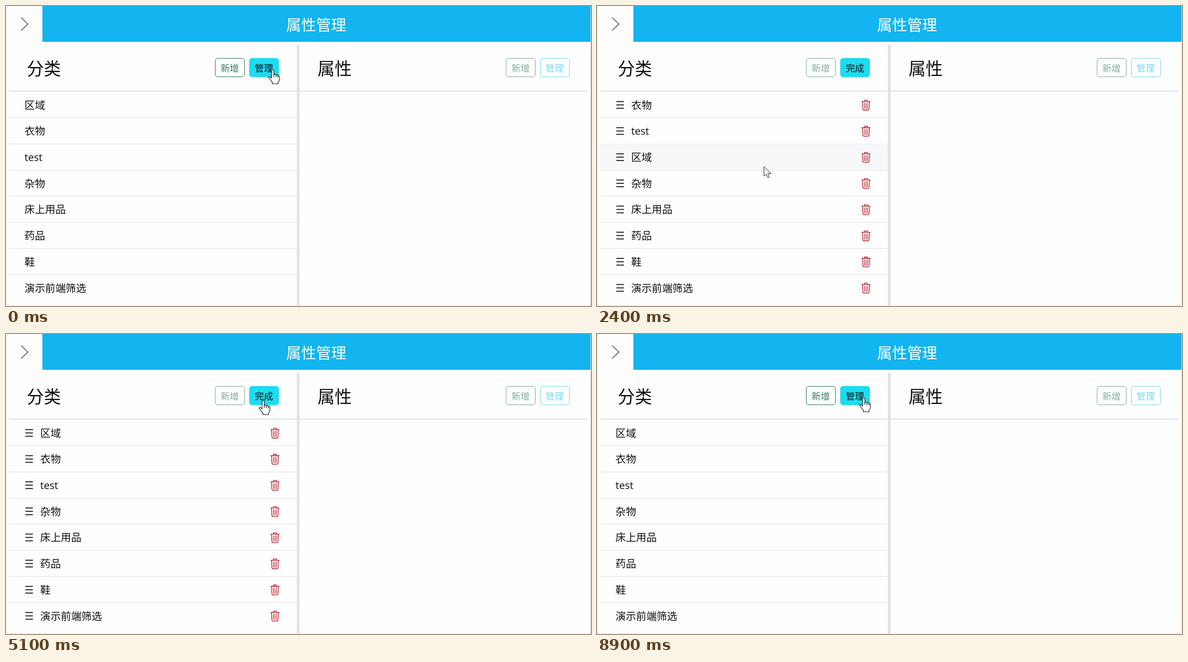
Write an HTML page with a canvas that moves like this. It is 1044 px wide and 536 px high and loops after 9 s.

```html
<!DOCTYPE html>
<html lang="zh-CN">
<head>
<meta charset="utf-8">
<title>属性管理</title>
<style>
html, body { margin: 0; width: 100%; height: 100%; overflow: hidden; background: #fff; }
canvas { display: block; }
</style>
</head>
<body>
<canvas id="stage" width="1044" height="536"></canvas>
<script>
const ctx = document.getElementById('stage').getContext('2d');
const LOOP = 9000, STEP = 100;
const TOP = 153, ROW = 46.7, LEFT = 5, WIDTH = 514;
const GREEN = '#347e62', CYAN = '#35bbdc', GRAY = '#dfe3e7', RED = '#b3202f', INK = '#0c0f12';
const FONT = '"Open Sans", "Noto Sans CJK SC", "Noto Sans CJK", sans-serif';
const NAMES = ['区域', '衣物', 'test', '杂物', '床上用品', '药品', '鞋', '演示前端筛选'];

// Pointer stops: time, x, y
const STOPS = [
  [0, 476, 114], [300, 476, 114], [1000, 301, 175], [1100, 301, 175],
  [1600, 299, 246], [2200, 298, 287], [2600, 298, 287], [3500, 290, 184],
  [3800, 290, 184], [4900, 459, 119], [5700, 459, 119], [6700, 688, 205],
  [7300, 688, 205], [7900, 476, 114], [9000, 476, 114]
];
const DRAGS = [
  { from: 1100, to: 2300, slot: 0, dx: -301, dy: -175 },
  { from: 2600, to: 3600, slot: 2, dx: -298, dy: -287 }
];

function pointer(t) {
  const i = STOPS.findIndex(s => s[0] > t);
  const [t0, x0, y0] = STOPS[i - 1], [t1, x1, y1] = STOPS[i];
  const u = (t - t0) / (t1 - t0), e = u * u * (3 - 2 * u);
  return { x: x0 + (x1 - x0) * e, y: y0 + (y1 - y0) * e };
}

const rowMid = i => 176.7 + ROW * i;
const slotAt = y => Math.floor((y - TOP) / ROW);

function rect(x, y, w, h, color) {
  ctx.fillStyle = color;
  ctx.fillRect(x, y, w, h);
}

function text(s, x, mid, size, color, align = 'left', weight = 400) {
  ctx.font = `${weight} ${size}px ${FONT}`;
  ctx.textAlign = align;
  ctx.fillStyle = color;
  ctx.fillText(s, x, mid + size * 0.38);
}

function line(points, color, width) {
  ctx.beginPath();
  points.forEach(([x, y], i) => i ? ctx.lineTo(x, y) : ctx.moveTo(x, y));
  ctx.strokeStyle = color;
  ctx.lineWidth = width;
  ctx.stroke();
}

function button(label, x, color, { filled = false, off = false } = {}) {
  ctx.save();
  if (off) ctx.globalAlpha = 0.62;
  ctx.beginPath();
  ctx.roundRect(x + 0.5, 93.5, 52, 33, 4.5);
  if (filled) {
    ctx.fillStyle = '#1edcf0';
    ctx.fill();
  }
  ctx.strokeStyle = filled ? '#1edcf0' : color;
  ctx.lineWidth = 1;
  ctx.stroke();
  text(label, x + 26.3, 110.3, 16.4, filled ? '#04151a' : color, 'center');
  ctx.restore();
}

function bars(y) {
  for (const d of [-6, 0, 6]) line([[34.5, y + d], [48, y + d]], INK, 1.6);
}

function trash(x, y) {
  ctx.save();
  ctx.translate(x, y);
  ctx.lineCap = ctx.lineJoin = 'round';
  line([[-7.5, -6.2], [7.5, -6.2]], RED, 1.3);
  line([[-3, -6.4], [-2.6, -8.7], [2.6, -8.7], [3, -6.4]], RED, 1.3);
  line([[-6.2, -6], [-5.3, 7.8], [-4, 9], [4, 9], [5.3, 7.8], [6.2, -6]], RED, 1.3);
  for (const k of [-1, 0, 1]) line([[k * 2.8, -3.4], [k * 2.4, 6.2]], RED, 1.1);
  ctx.restore();
}

function rowItems(name, y, manage) {
  if (manage) {
    bars(y);
    trash(480, y + 0.3);
  }
  text(name, manage ? 61 : 33, y, 18.4, INK);
}

function glow(p, mid, alpha) {
  ctx.save();
  ctx.beginPath();
  ctx.rect(LEFT, mid - ROW / 2, WIDTH, ROW);
  ctx.clip();
  ctx.translate(p.x, p.y);
  ctx.scale(1, 0.14);
  const g = ctx.createRadialGradient(0, 0, 20, 0, 0, 210);
  g.addColorStop(0, `rgba(222,225,229,${alpha})`);
  g.addColorStop(1, 'rgba(222,225,229,0)');
  ctx.fillStyle = g;
  ctx.fillRect(-300, -400, 600, 800);
  ctx.restore();
}

function ghost(p, drag) {
  const mid = rowMid(drag.slot) + p.y + drag.dy;
  glow(p, mid, 0.45);
  ctx.save();
  ctx.globalAlpha = 0.2;
  ctx.translate(p.x + drag.dx, 0);
  rowItems(NAMES[0], mid, true);
  ctx.restore();
}

function arrow({ x, y }) {
  const shape = [[0, 0], [0, 17], [4, 13.3], [6.8, 19.8], [9.6, 18.6], [6.9, 12.3], [12.5, 12.3]];
  ctx.beginPath();
  shape.forEach(([a, b]) => ctx.lineTo(x + a, y + b));
  ctx.closePath();
  ctx.fillStyle = '#fff';
  ctx.fill();
  ctx.strokeStyle = '#222';
  ctx.lineWidth = 1;
  ctx.stroke();
}

const HAND = new Path2D('M-2 2Q-2 0 0 0Q2 0 2 2V8.5Q4.5 7 5.8 9.3Q8.2 8 9.3 10.3' +
  'Q12 9.6 12 12.5V17Q12 20 9.5 22V25H-.5V22.5Q-3 20-5.5 16Q-8.5 12.5-6.5 12Q-4.5 11.5-2 15Z');
const KNUCKLES = new Path2D('M2 8.5V13M5.8 9.3V13.5M9.3 10.3V14');

function hand({ x, y }) {
  ctx.save();
  ctx.translate(x, y);
  ctx.lineJoin = 'round';
  ctx.fillStyle = '#fff';
  ctx.strokeStyle = '#14181c';
  ctx.lineWidth = 1.1;
  ctx.fill(HAND);
  ctx.stroke(HAND);
  ctx.stroke(KNUCKLES);
  ctx.restore();
}

function forbidden({ x, y }) {
  ctx.beginPath();
  ctx.arc(x, y, 8.2, 0, Math.PI * 2);
  ctx.fillStyle = '#fff';
  ctx.fill();
  ctx.strokeStyle = '#a90f22';
  ctx.lineWidth = 2.5;
  ctx.stroke();
  line([[x - 5.5, y - 5.5], [x + 5.5, y + 5.5]], '#a90f22', 2.5);
}

function frame() {
  rect(0, 0, 1044, 536, '#fefefe');
  rect(0, 0, 1, 536, '#e6e6e6');
  rect(1043, 0, 1, 536, '#dcd6d8');
  rect(0, 535, 1044, 1, '#e3e3e5');
  rect(65, 0, 978, 64, '#12b5f0');
  line([[27, 20.5], [39, 32.2], [27, 44]], '#666', 1.7);
  text('属性管理', 553.5, 33.5, 26.8, '#fff', 'center', 350);
  text('分类', 37, 111, 30.6, INK, 'left', 350);
  text('属性', 556, 111, 30.6, INK, 'left', 350);
  button('新增', 892, GREEN, { off: true });
  button('管理', 953, CYAN, { off: true });
}

function draw(t) {
  const p = pointer(t);
  const manage = t >= 300 && t < 5200;
  const drag = DRAGS.find(d => t >= d.from && t < d.to);
  const overButton = p.x >= 435 && p.x <= 487 && p.y >= 93 && p.y <= 127;

  let slot = t < 1100 || t >= 3600 ? 0 : 2;
  if (drag) slot = Math.min(2, Math.max(0, slotAt(p.y)));
  const order = NAMES.slice(1);
  order.splice(slot, 0, NAMES[0]);

  let hover = p.x > LEFT && p.x < LEFT + WIDTH ? slotAt(p.y) : -1;
  if (drag) hover = drag.slot;
  else if (t >= 3600 && t < 3800) hover = 2;

  frame();
  button('新增', 373, GREEN, { off: manage });
  button(manage ? '完成' : '管理', 434, CYAN, { filled: manage || overButton });

  order.forEach((name, i) => {
    const y = TOP + ROW * i;
    if (drag && i === slot) rect(LEFT, y, WIDTH, ROW, '#e8eaed');
    else if (i === hover) rect(LEFT, y, WIDTH, ROW, '#f8f8fb');
    if (i < 7) rect(LEFT, Math.round(y + ROW - 0.6), WIDTH, 1, '#e0e3e6');
    rowItems(name, rowMid(i), manage);
  });
  rect(LEFT, 151, WIDTH, 2.3, GRAY);
  rect(524, 151, WIDTH, 2.3, GRAY);
  rect(519, 69, 5, 467, GRAY);

  if (drag) ghost(p, drag);
  else if (t >= 3600 && t < 3800) glow(p, rowMid(0), 0.4 - (t - 3600) / 500);

  if (drag || (t >= 3600 && t < 3700)) forbidden(p);
  else if (overButton) hand(p);
  else arrow(p);
}

function tick(now) {
  draw(Math.floor((now % LOOP) / STEP) * STEP);
  requestAnimationFrame(tick);
}
draw(0);
requestAnimationFrame(tick);
</script>
</body>
</html>
```
